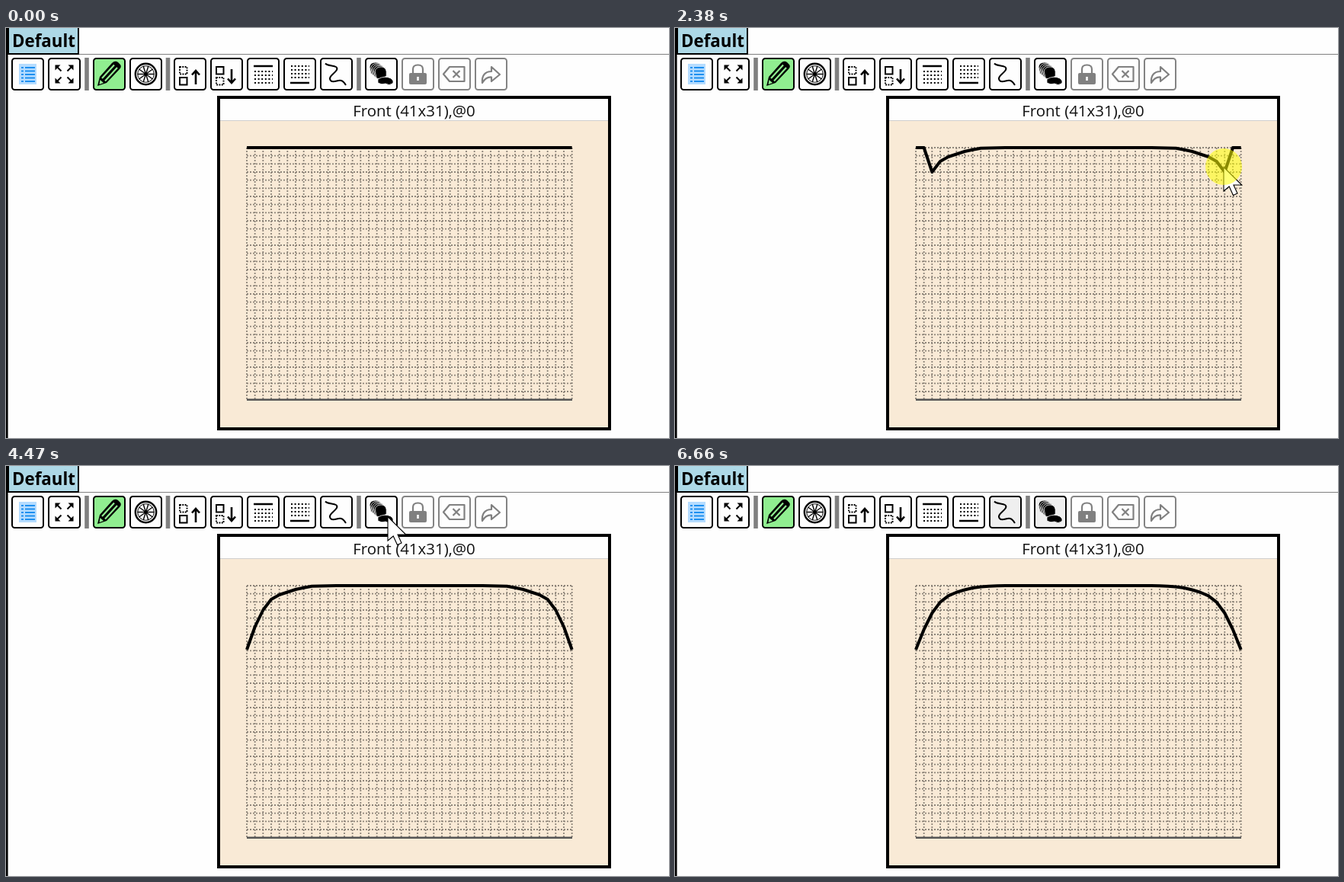
Recreate the animation shown at these times as an HTML page. Size 870 by 538 pixels, loop 7670 ms.

```html
<!DOCTYPE html>
<html lang="en">
<head>
<meta charset="utf-8">
<title>Front profile editor</title>
<style>
  html, body { margin: 0; width: 100%; height: 100%; overflow: hidden; background: #fefefe; }
  svg { display: block; width: 870px; height: 538px; }
  text { font-family: "Open Sans", "Noto Sans", sans-serif; }
  .btn { fill: #fefefe; stroke: #000; stroke-width: 2; }
  .off { stroke: #848484; }
  .line { fill: none; stroke: #000; stroke-width: 2; }
  .bold { fill: none; stroke: #000; stroke-width: 2.6; }
  .gray { fill: none; stroke: #808080; stroke-width: 2.2; stroke-linejoin: round; }
  .dots { fill: none; stroke: #000; stroke-width: 2; stroke-dasharray: 2 2.6; }
  .box { fill: none; stroke: #000; stroke-width: 2; stroke-dasharray: 1.9 1.4; }
  .mesh { fill: none; stroke: #000; stroke-opacity: .43; stroke-width: 1.8; stroke-dasharray: 2; }
</style>
</head>
<body>
<svg viewBox="0 0 870 538">
  <rect width="870" height="538" fill="#fefefe"/>
  <path d="M96 34.5H870" stroke="#808080"/>
  <rect width="2.6" height="538"/>
  <rect x="3" y="-4" width="92" height="38" fill="#add8e6" stroke="#000" stroke-width="2"/>
  <text x="8" y="25" font-size="22.3" font-weight="700">Default</text>
  <path d="M106 39V82M212.5 39V82M463 39V82" stroke="#808080" stroke-width="5.6"/>
  <g id="buttons"></g>

  <!-- list -->
  <g transform="translate(7 39)">
    <rect x="10" y="8" width="23" height="27" fill="#b5dcff"/>
    <path d="M13 13H16M13 17.5H16M13 22H16M13 26.5H16M13 31H16M18 13H31M18 17.5H31M18 22H31M18 26.5H31M18 31H31" stroke="#1e90f0" stroke-width="2"/>
  </g>
  <!-- expand -->
  <g transform="translate(76.5 60.5)" id="expand"></g>
  <!-- pencil -->
  <g transform="translate(114 39)">
    <path d="M6 37L9 25L25 7Q29 3 33 6L36 9Q38 12 35 15L18 33Z"/>
    <path d="M12 27L28 9.500M16 30.500L32 13" stroke="#90ee90" stroke-width="2.200" fill="none"/>
    <path d="M9.500 29L14 33L8.500 35Z" fill="#90ee90"/>
  </g>
  <!-- wheel -->
  <g transform="translate(183.5 60.5)" fill="none" stroke="#000">
    <circle r="13.700" stroke-width="2.400"/>
    <circle r="10.800" stroke-width="1"/>
    <g id="spokes" stroke-width="1.400"></g>
    <circle r="2.200" fill="#000" stroke="none"/>
  </g>
  <!-- row up / row down -->
  <g transform="translate(220 39)">
    <rect class="box" x="8" y="12" width="9.500" height="9.500"/>
    <rect class="line" x="8" y="26" width="9.500" height="9.500"/>
    <path class="bold" d="M29 35V17M24 22.500L29 17L34 22.500"/>
  </g>
  <g transform="translate(268 39)">
    <rect class="line" x="8" y="12" width="9.500" height="9.500"/>
    <rect class="box" x="8" y="26" width="9.500" height="9.500"/>
    <path class="bold" d="M28 15V33M23 27.500L28 33L33 27.500"/>
  </g>
  <!-- top edge / bottom edge -->
  <path class="bold" d="M325 50H350M373 72H398"/>
  <path class="dots" d="M326 57H350M326 62H350M326 67H350M326 72H350M374 50H398M374 55H398M374 60H398M374 65H398"/>
  <!-- smooth -->
  <path class="line" d="M419 46.500C423 51 437 48 434 55C431 60 422 64 426 69C430 73 436 67 440 69Q443 70 446 75"/>
  <!-- stack -->
  <g id="stack" stroke="#fff" stroke-width=".8"></g>
  <!-- lock -->
  <rect x="529" y="59" width="23" height="15" rx="2" fill="#808080"/>
  <path class="gray" d="M534 60V54Q534 48.500 540.500 48.500T547 54V60"/>
  <path d="M540.500 64V69" stroke="#fefefe" stroke-width="2.600"/>
  <!-- erase -->
  <path class="gray" d="M574 60.500L582 51H601.500V70H582ZM586.500 56L595.500 65M595.500 56L586.500 65"/>
  <!-- forward -->
  <path class="gray" d="M625 72C624 62 629 57 637 57V51L648 61L637 70V64.500C631 64 628 67 625 72Z"/>

  <rect x="279" y="91" width="513" height="435" fill="#f9ead6" stroke="#000" stroke-width="4"/>
  <rect x="281" y="93" width="509" height="28" fill="#fefefe"/>
  <path d="M281 121.5H790" stroke="#d0d0d0"/>
  <text x="535.5" y="116" font-size="20.45" text-anchor="middle" fill="#111">Front (41x31),@0</text>
  <path id="mesh" class="mesh"/>
  <path d="M316 487.700H743" stroke="#555" stroke-width="2.600"/>
  <polyline id="profile" fill="none" stroke="#000" stroke-width="4" stroke-linejoin="round"/>
  <path id="cursor" d="M0 .5V32L7.200 26L12.500 37.500L18 35L13 24H23.800Z" fill="#fff" stroke="#000" stroke-width="1.100"/>
  <circle id="press" r="24" fill="#ff0" fill-opacity=".54"/>
</svg>
<script>
const LOOP = 7670, STEP = 77.47, LAG = 32;
const LEFT = 316, TOP = 157, CELL = 32 / 3, COLS = 40, ROWS = 31;
const $ = id => document.getElementById(id);
const SVG = "http://www.w3.org/2000/svg";

function add(parent, tag, attrs) {
  const el = document.createElementNS(SVG, tag);
  for (const name in attrs) el.setAttribute(name, attrs[name]);
  return $(parent).appendChild(el);
}

// Toolbar
const buttons = [7, 55, 114, 162, 220, 268, 316, 364, 412, 471, 519, 567, 615].map((x, i) =>
  add("buttons", "rect", { class: i > 9 ? "btn off" : "btn", x: x + 1, y: 40, width: 41, height: 41, rx: 3.5 }));
buttons[2].style.fill = "#90ee90";
const smoothBtn = buttons[8], stackBtn = buttons[9];

for (let a = 0; a < 360; a += 90) {
  add("expand", "path", { d: "M4 4L9 9", class: "line", transform: `rotate(${a})` });
  add("expand", "path", { d: "M12 12H5L12 5Z", transform: `rotate(${a})` });
}
for (let a = 18; a < 360; a += 36)
  add("spokes", "path", { d: "M0 0V-11", transform: `rotate(${a})` });
for (let i = 0; i < 5; i++)
  add("stack", "path", {
    d: "M0 6Q1 0 8 0Q14 0 15 6V12Q8 17 2 15Z",
    transform: `translate(${477 + i * 1.8} ${45 + i * 1.5})`
  });
add("stack", "path", { d: "M488 67Q497 62 505 66Q510 70 507 73Q503 76 498 73Q493 75 488 72Z" });

// Dashed mesh
let mesh = "";
for (let c = 0; c <= COLS; c++) mesh += `M${LEFT + c * CELL} ${TOP}v${ROWS * CELL}`;
for (let r = 0; r < ROWS; r++) mesh += `M${LEFT} ${TOP + r * CELL}h${COLS * CELL}`;
$("mesh").setAttribute("d", mesh);

// Pointer path: step, x, y
const path = [
  [1, 683, 525], [3, 668, 460], [5, 640, 335], [7, 618, 225], [9, 608, 170], [11, 606, 152], [12, 606, 149],
  [17, 606, 149], [20, 637, 154], [24, 678, 160], [27, 701, 166], [31, 720, 182], [37, 736, 209],
  [40, 741, 219], [46, 751, 239], [50, 751, 239], [52, 715, 213], [55, 596, 130], [58, 501, 66],
  [60, 466, 58], [63, 445, 57], [77, 445, 57], [79, 470, 90], [82, 575, 270], [85, 704, 515]
];

function pointer(k) {
  let i = 0;
  while (i < path.length - 2 && path[i + 1][0] <= k) i++;
  const [a, b] = [path[i], path[i + 1]];
  const u = Math.min(1, Math.max(0, (k - a[0]) / (b[0] - a[0])));
  return [a[1] + (b[1] - a[1]) * u, a[2] + (b[2] - a[2]) * u];
}

// Depth of the drawn profile, counted inwards from either end
const drawn = [84, 54, 32, 18, 12, 8.5, 5, 2.8, .8, .5, .3];

function depths(k) {
  const [x, y] = pointer(Math.min(k, 47));
  // Innermost column the pointer has come to
  const edge = Math.ceil(COLS - (x + 1) / CELL + LEFT / CELL - .1);
  let d = Array.from({ length: COLS + 1 }, (_, c) => {
    const n = Math.min(c, COLS - c);
    if (k < 18 || n < edge) return 0;
    return n === 0 && k < 48 ? y - TOP : drawn[n] || 0;
  });
  for (const click of [69, 75])
    if (k >= click)
      d = d.map((v, c) => c % COLS ? (d[c - 1] + 2 * v + d[c + 1]) / 4 : v);
  return d;
}

const within = (k, a, b) => k >= a && k < b;
const show = (el, on) => el.setAttribute("visibility", on ? "visible" : "hidden");

function draw(ms) {
  const k = Math.floor((ms % LOOP + LAG) / STEP);
  const at = `translate(${pointer(k).map(v => Math.round(v)).join(" ")})`;
  $("cursor").setAttribute("transform", at);
  $("press").setAttribute("transform", at);
  show($("cursor"), within(k, 1, 86));
  show($("press"), within(k, 15, 51) || within(k, 67, 69) || within(k, 73, 75));
  $("profile").setAttribute("points",
    depths(k).map((d, c) => `${LEFT + c * CELL},${TOP + d}`).join(" "));
  stackBtn.style.fill = k < 59 ? "#fefefe" : k < 62 ? "#d0d0d0" : "#efefef";
  smoothBtn.style.fill = k < 62 ? "#fefefe" : k < 79 ? "#d0d0d0" : "#efefef";
}

const start = performance.now();
function tick() {
  draw(performance.now() - start);
  requestAnimationFrame(tick);
}
tick();
</script>
</body>
</html>
```
